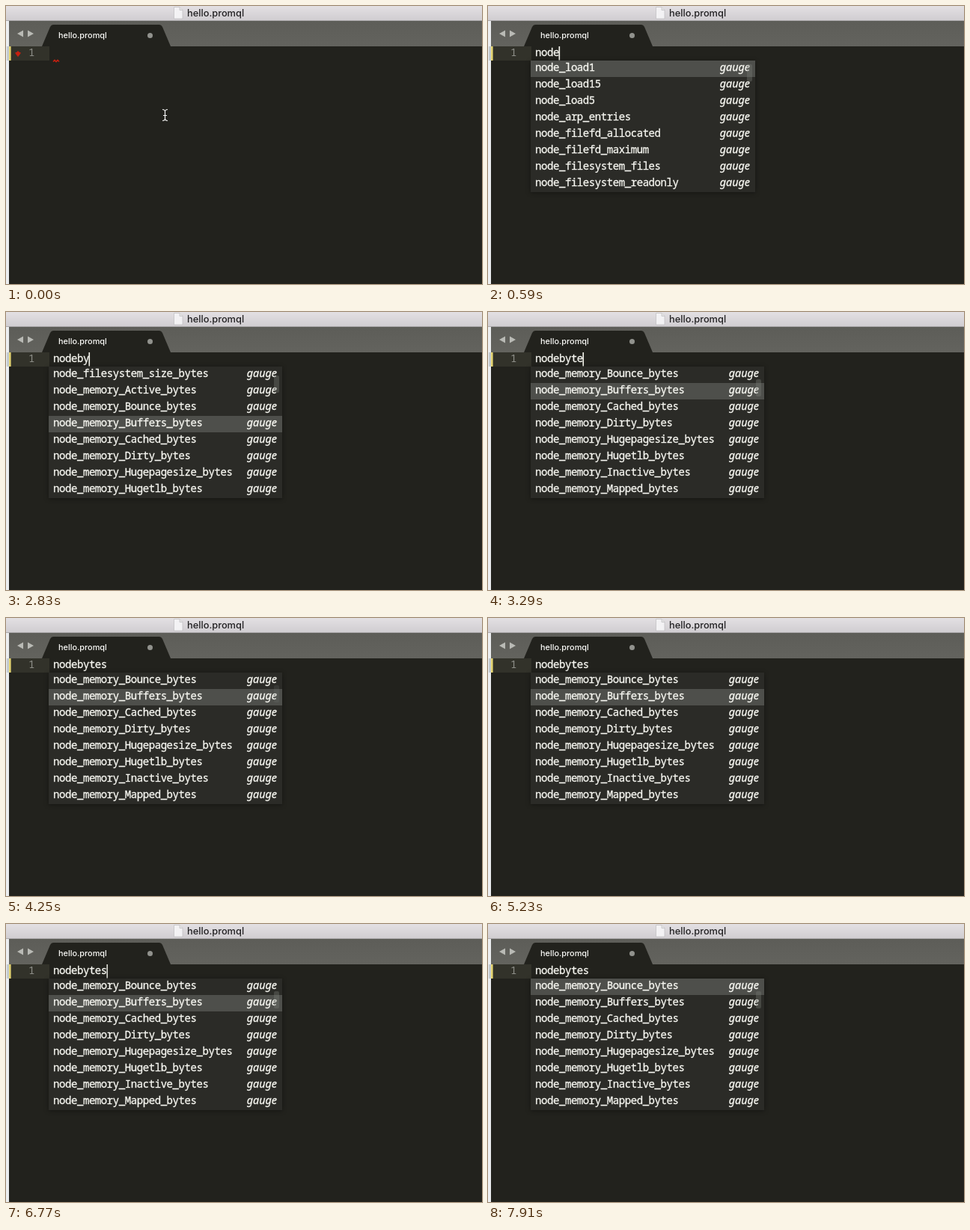
These frames come from a looping animation (636 by 372 pixels, 8 s). An HTML page:

```html
<!DOCTYPE html>
<html lang="en">
<head>
<meta charset="utf-8">
<title>hello.promql</title>
<style>
  html, body { margin: 0; width: 100%; height: 100%; overflow: hidden; background: #22221d; }
  svg { display: block; width: 636px; height: 372px; }
  text { white-space: pre; }
  .ui { font-family: Inter, Roboto, sans-serif; font-weight: 500; }
  .code, .kind { fill: #f8f8f2; stroke: #f8f8f2; stroke-width: .3px; }
  .code { font: 14px "Noto Sans Mono", "DejaVu Sans Mono", monospace; letter-spacing: -.42px; }
  .kind { font: italic 14.4px "Noto Sans", "Open Sans", sans-serif; }
  .line { fill: #8f908a; stroke: none; }
  #popup { filter: drop-shadow(0 1px 3px rgba(0, 0, 0, .4)); }
</style>
</head>
<body>
<svg viewBox="0 0 636 372">
  <defs>
    <linearGradient id="title" x2="0" y2="1">
      <stop stop-color="#e3e0e3"/><stop offset="1" stop-color="#cfccd0"/>
    </linearGradient>
    <linearGradient id="strip" x2="0" y2="1">
      <stop stop-color="#5d5d58"/><stop offset="1" stop-color="#63635e"/>
    </linearGradient>
  </defs>

  <rect width="636" height="372" fill="#22221d"/>
  <rect y="20" width="636" height="34" fill="url(#strip)"/>
  <rect width="636" height="20" fill="url(#title)"/>
  <rect y="19" width="636" height="1" fill="#aaa8aa"/>
  <rect y="20" width="4" height="352" fill="#eceef0"/>
  <rect x="1" y="54" width="3" height="19" fill="#c4cbd0"/>

  <path d="M224.500 1.500h7.500l4 4v11.500h-11.500z" fill="#f3f2f4" stroke="#bfbdc0" stroke-width=".7"/>
  <path d="M232 1.500v4h4" fill="#e4e4e4" stroke="#bfbdc0" stroke-width=".7"/>
  <text class="ui" x="242" y="14" font-size="12.800" fill="#222123">hello.promql</text>

  <path d="M48 54L59 28Q60.500 25 63 25H205Q207.500 25 209 28L220 54z" fill="#22221d"/>
  <path d="M23 32.500v9L15 37zM29 32.500v9l8-4.500z" fill="#b9bab5"/>
  <text class="ui" x="70" y="43" font-size="10.900" fill="#fafaf7">hello.promql</text>
  <circle cx="192.500" cy="39.500" r="3.500" fill="#91928d"/>

  <rect x="4" y="54" width="54" height="19" fill="#32322a"/>
  <rect x="4" y="54" width="2.600" height="19" fill="#e5d571"/>
  <text class="code line" x="30" y="67">1</text>

  <g id="error" fill="none" stroke="#c52010">
    <path d="M16 60.500l3 3-3 4-3-4z" fill="#c52010"/>
    <path d="M12.500 62.500h7"/>
    <path d="M63 74.500l2-2 2 2 2-2 2 2" stroke-width="1.600"/>
  </g>
  <g id="mouse" fill="none">
    <path id="beam" d="M209 138.500q3.500 0 3.500 3v9q0 3-3.500 3M216 138.500q-3.500 0-3.500 3M216 153.500q-3.500 0-3.500-3M210 146.500h5" stroke-width="1.200"/>
    <use href="#beam" stroke="#f4f4f4"/>
  </g>

  <text id="typed" class="code" x="63" y="67"></text>
  <rect id="caret" y="54" width="1.600" height="18.500" fill="#f8f8f0"/>

  <g id="popup">
    <rect id="panel" x="57" y="73" height="176" fill="#2b2b27"/>
    <rect id="pick" x="57" height="22" fill="#4e4f4b"/>
    <g id="rows"></g>
    <rect id="thumb" width="7" height="23" rx="2" fill="#7c7d79" fill-opacity=".35"/>
  </g>
</svg>
<script>
const LOOP = 8000, ROW = 22, TOP = 73, CHAR = 7.98;
const $ = id => document.getElementById(id);

const gauges = ["load1", "load15", "load5", "arp_entries", "filefd_allocated",
  "filefd_maximum", "filesystem_files", "filesystem_readonly"].map(s => "node_" + s);
const sizes = ["filesystem_size", "memory_Active", "memory_Bounce", "memory_Buffers",
  "memory_Cached", "memory_Dirty", "memory_Hugepagesize", "memory_Hugetlb",
  "memory_Inactive", "memory_Mapped"].map(s => `node_${s}_bytes`);

// step tables: [time, value]
const typing = [[0, ""], [170, "n"], [290, "no"], [430, "nod"], [570, "node"],
  [2310, "nodeb"], [2570, "nodeby"], [3110, "nodebyt"], [3250, "nodebyte"], [3530, "nodebytes"]];
const views = [
  [0, null],
  [410, { list: gauges, width: 300, bar: 78 }],
  [2390, { list: sizes.slice(0, 8), width: 312, bar: 85 }],
  [3130, { list: sizes.slice(2), width: 312, bar: 90 }]
];
const picks = [[0, 0], [2390, 3], [3130, 1], [5310, 2], [5770, 3], [6190, 2], [6750, 1], [7070, 0]];

// ramps: [time, opacity], linear between entries
const blink = [[0, 0], [169, 0], [170, 1], [2149, 1], [2150, .35], [2309, .35], [2310, 1],
  [3990, 1], [4190, 0], [4390, 0], [4570, 1], [4950, 1], [5150, 0],
  [6250, 0], [6430, 1], [6750, 1], [6910, 0], [7090, 0], [7250, 1], [7590, 1], [7770, 0], [8000, 0]];
const barFade = [[0, 1], [4050, 1], [4450, 0], [5290, 0], [5430, 1], [8000, 1]];

const step = (table, t) => table.filter(e => e[0] <= t).pop()[1];
function ramp(table, t) {
  const i = table.findIndex(e => e[0] > t);
  const [t0, a] = table[i - 1], [t1, b] = table[i];
  return a + (b - a) * (t - t0) / (t1 - t0);
}
const set = (id, attrs) => {
  for (const k in attrs) $(id).setAttribute(k, attrs[k]);
};

let shown;
function showView(view) {
  if (view === shown) return;
  shown = view;
  $("popup").style.display = view ? "" : "none";
  if (!view) return;
  set("panel", { width: view.width });
  set("pick", { width: view.width });
  set("thumb", { x: 46 + view.width, y: view.bar });
  $("rows").innerHTML = view.list.map((name, i) => {
    const y = TOP + 14 + i * ROW;
    return `<text class="code" x="63" y="${y}">${name}</text>` +
      `<text class="kind" x="${50 + view.width}" y="${y}" text-anchor="end">gauge</text>`;
  }).join("");
}

function draw(t) {
  const word = step(typing, t);
  if ($("typed").textContent !== word) $("typed").textContent = word;
  set("caret", { x: 62.6 + word.length * CHAR, opacity: ramp(blink, t) });
  set("mouse", { opacity: t < 170 ? 1 : 0 });
  set("error", { opacity: t < 410 ? 1 : 0 });
  showView(step(views, t));
  set("pick", { y: TOP + step(picks, t) * ROW });
  set("thumb", { opacity: ramp(barFade, t) });
}

const start = performance.now();
function tick() {
  draw((performance.now() - start) % LOOP);
  requestAnimationFrame(tick);
}
tick();
</script>
</body>
</html>
```
